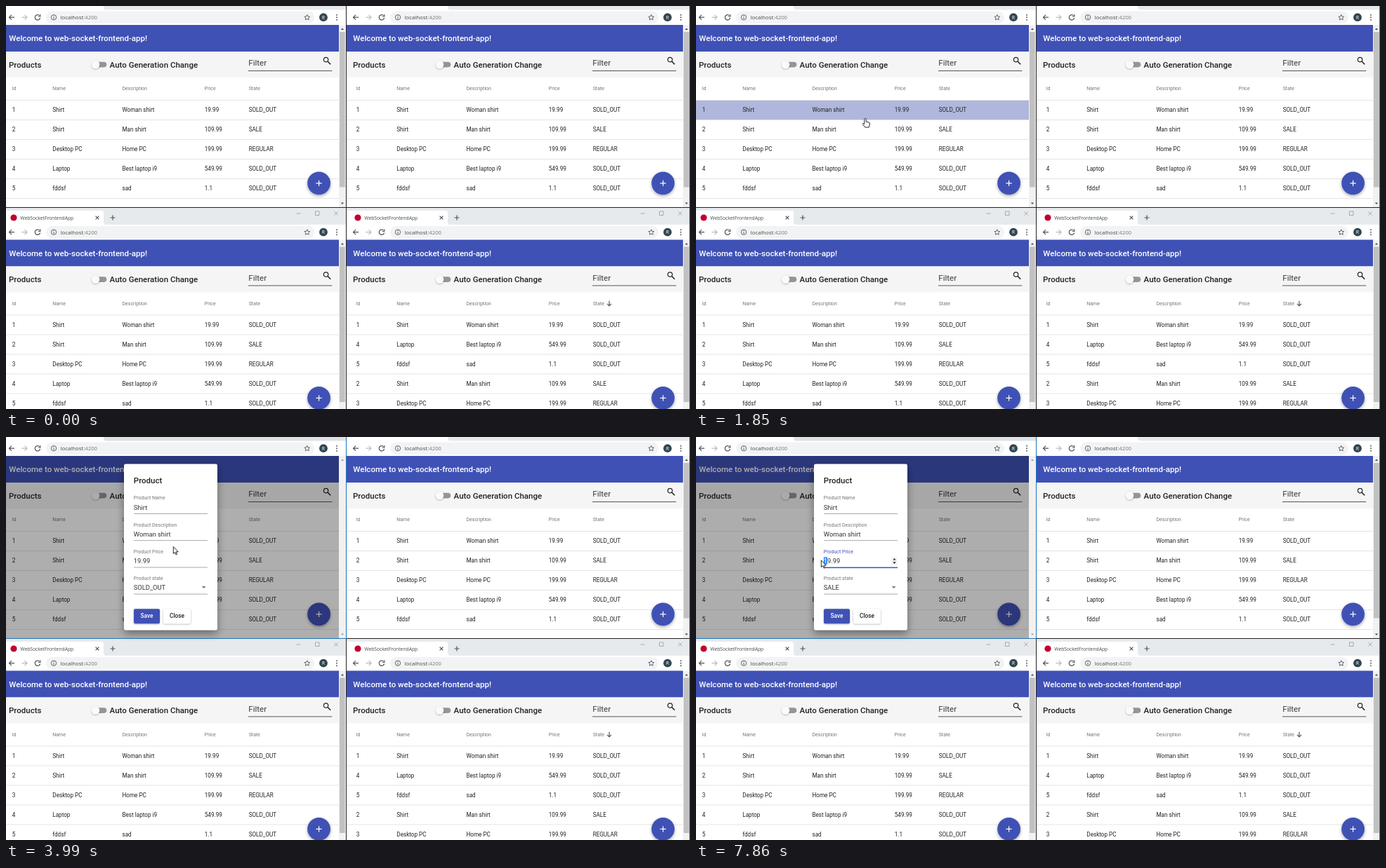
Write an HTML page that moves like this. It is 974 px wide and 575 px high and loops after 8 s.

```html
<!DOCTYPE html>
<html lang="en">
<head>
<meta charset="utf-8">
<title>Product list in four windows</title>
<style>
  html, body { margin: 0; width: 100%; height: 100%; overflow: hidden; background: #fff; }
  svg { display: block; font-family: Roboto, sans-serif; font-size: 8.15px; }
  text { white-space: pre; fill: #222; }
  .medium { font-weight: 500; font-size: 11.5px; }
  .small { font-size: 7px; fill: #757575; }
  .input { font-size: 9.33px; fill: #333; }
  .ui { font-family: "Open Sans", sans-serif; }
  .line { fill: none; stroke: #50545a; stroke-width: 1.2; }
  .field.focus .small { fill: #3f51b5; }
  .field .rule { fill: #949494; height: .8px; }
  .field.focus .rule { fill: #3f51b5; height: 1.5px; }
  .field.focus .drop { fill: #3f51b5; }
  .drop { fill: #757575; }
  .pointer { fill: #fff; stroke: #111; stroke-width: .9; stroke-linejoin: round; }
</style>
</head>
<body>
<svg id="stage" width="974" height="575" viewBox="0 0 974 575"></svg>
<script>
const LOOP = 8000;
const BLUE = '#3f51b5';
const COLUMNS = [8.7, 66.3, 165.5, 282.8, 345.7];
const HEADINGS = ['Id', 'Name', 'Description', 'Price', 'State'];
const PRODUCTS = [
  ['1', 'Shirt', 'Woman shirt', '19.99', 'SOLD_OUT'],
  ['2', 'Shirt', 'Man shirt', '109.99', 'SALE'],
  ['3', 'Desktop PC', 'Home PC', '199.99', 'REGULAR'],
  ['4', 'Laptop', 'Best laptop i9', '549.99', 'SOLD_OUT'],
  ['5', 'fddsf', 'sad', '1.1', 'SOLD_OUT'],
];
const STATES = ['SOLD_OUT', 'SALE', 'REGULAR', 'COMING_SOON'];
const ROW_TOP = 134.5, ROW_HEIGHT = 28;
const RIGHT = 490, LOWER = 306.5;

// Times of the user's actions in ms
const ACTIVATE = 3590, OPEN = 3820, AUTOFOCUS = 4070, SELECT = 4830, PICK = 6500, DRAG = 7480;

// Pointer stops: time, x, y
const PATH = [
  [0, 655, 610], [160, 640, 578], [310, 590, 515], [470, 515, 395], [620, 408, 212],
  [700, 374.8, 175.5], [930, 277, 143], [1010, 277, 143], [1300, 241, 145], [1620, 241, 145],
  [1850, 241, 160.5], [2090, 240, 167], [2480, 240, 167], [2710, 238.3, 156.5],
  [4000, 238.3, 156.5], [4600, 212, 211], [4900, 212, 211], [5200, 220, 196],
  [5520, 210.8, 204], [5670, 210.8, 204], [5850, 226, 186], [6070, 194, 168],
  [6220, 194, 168], [6450, 196, 149], [6600, 196, 149], [6990, 226, 173.5],
  [7070, 226, 173.5], [7310, 191, 174], [7480, 188, 175], [7860, 178.3, 175.8], [8000, 178.3, 175.8],
];

const rect = (x, y, w, h, fill, extra = '') =>
  `<rect x="${x}" y="${y}" width="${w}" height="${h}" fill="${fill}" ${extra}/>`;
const text = (x, y, string, extra = '') => `<text x="${x}" y="${y}" ${extra}>${string}</text>`;
const line = (d, extra = '') => `<path class="line" d="${d}" ${extra}/>`;
const shape = (d, fill, extra = '') => `<path d="${d}" fill="${fill}" ${extra}/>`;
const circle = (x, y, r, fill, extra = '') =>
  `<circle cx="${x}" cy="${y}" r="${r}" fill="${fill}" ${extra}/>`;

function browserChrome() {
  return rect(-5, -18.5, 490, 24.5, '#e7eaed', 'class="strip"') +
    shape('M-5 6V-14.5H136Q139 -14.5 139 -11.5V2Q139 5.5 143 5.5V6Z', '#fff') +
    circle(11, -4.5, 4.6, '#c3002f') +
    text(20.3, -2, 'WebSocketFrontendApp', 'class="ui" font-size="6.75" style="fill:#45494d"') +
    line('M127.6 -6.9l4.8 4.8m0 -4.8l-4.8 4.8', 'stroke-width="1"') +
    line('M148.5 -4.5h7M152 -8v7') +
    line('M413.5 -10.5h6M440.5 -13.5h5.5v5.5h-5.5zM467.3 -13.3l5.4 5.4m0 -5.4l-5.4 5.4',
      'style="stroke:#999;stroke-width:.8"') +
    rect(-5, 5.5, 490, 21.5, '#fff') +
    rect(57, 7.5, 382, 17.5, '#f1f3f4', 'rx="8.75"') +
    line('M12 16.2H4.5M8 12.7L4.5 16.2L8 19.7') +
    line('M22.5 16.2H30M26.5 12.7L30 16.2L26.5 19.7', 'style="stroke:#bbb"') +
    line('M47.6 13.6A3.7 3.7 0 1 0 48.6 17M48.8 12v3h-3') +
    `<circle class="line" cx="68" cy="16.2" r="3.7" style="stroke-width:.9"/>` +
    line('M68 15.8v2.6M68 13.8v1', 'style="stroke-width:1"') +
    text(77.5, 19, 'localhost<tspan fill="#777">:4200</tspan>', 'class="ui" font-size="7.8" style="fill:#444"') +
    line('M428.8 12.4l1.15 2.5 2.75.3-2.05 1.85.57 2.7-2.42-1.37-2.42 1.37.57-2.7-2.05-1.85 2.75-.3z',
      'style="stroke-width:.9"') +
    circle(452, 16.2, 5.9, '#2f4550') +
    text(452, 18.5, 'R', 'font-size="6.3" text-anchor="middle" style="fill:#fff"') +
    [12.7, 16.2, 19.7].map(y => circle(471, y, .95, '#50545a')).join('');
}

function tableRow(cells, index) {
  const y = ROW_TOP + index * ROW_HEIGHT;
  return rect(-5, y, 479, ROW_HEIGHT, '#fff', 'class="row"') +
    rect(-5, y - .4, 479, .8, '#dedede') +
    cells.map((cell, i) => text(COLUMNS[i], y + 16.6, cell)).join('');
}

function scrollbar() {
  return rect(474, 27, 10.5, 260, '#f1f1f1') +
    rect(475, 37, 7.8, 221.5, '#c1c1c1', 'class="thumb"') +
    shape('M476.8 34h4.4l-2.2 -2.6zM476.8 280.5h4.4l-2.2 2.6z', '#505050', 'class="arrows"');
}

function page(order, sorted) {
  return rect(-5, 27, 479, 260, '#fff') +
    rect(-5, 27, 479, 38, BLUE) +
    text(4.3, 50.1, 'Welcome to web-socket-frontend-app!', 'class="medium" style="fill:#fff"') +
    rect(-5, 65, 479, 37, '#f5f5f5') +
    text(4, 87.6, 'Products', 'class="medium"') +
    rect(123.5, 79.8, 19.8, 7.6, '#979398', 'rx="3.8"') +
    circle(127.6, 83.6, 5.7, '#fafafa', 'filter="url(#soft)"') +
    text(147.6, 87.6, 'Auto Generation Change', 'class="medium"') +
    text(345.2, 85.3, 'Filter', 'font-size="11.67" style="fill:#3c3c3c"') +
    rect(345, 92, 119.3, .9, '#444') +
    '<circle class="line" cx="455.6" cy="76.6" r="3.2" style="stroke:#222"/>' +
    line('M458 79l4.2 4.2', 'style="stroke:#222;stroke-width:1.6"') +
    HEADINGS.map((label, i) => text(COLUMNS[i], 120.1, label, 'class="small"')).join('') +
    (sorted ? line('M369 114.3v6.8M366 118.3l3 3 3 -3', 'style="stroke:#555"') : '') +
    order.map((id, i) => tableRow(PRODUCTS[id - 1], i)).join('') +
    rect(-5, 274.1, 479, .8, '#dedede') +
    circle(445.6, 252.8, 16.4, BLUE, 'filter="url(#lift)"') +
    line('M441.5 252.8h8.2M445.6 248.7v8.2', 'style="stroke:#fff;stroke-width:1.2"') +
    scrollbar();
}

function browser(dx, dy, clip, order, sorted = false) {
  return `<g clip-path="url(#${clip})"><g class="window" transform="translate(${dx} ${dy})">` +
    browserChrome() + page(order, sorted) + '</g></g>';
}

function field(name, label, value, y, extra = '') {
  return `<g class="field" id="${name}">` + text(181.8, y, label, 'class="small"') +
    text(181.8, y + 14.1, value, 'class="input value"') +
    rect(182, y + 19.7, 105, .8, '', 'class="rule"') + extra + '</g>';
}

function dialog() {
  const spinner = '<g id="spinner">' + rect(278.5, 171.5, 8, 10.5, '#f0f0f0') +
    shape('M280.3 175.6h4.4l-2.2 -2.7zM280.3 178.2h4.4l-2.2 2.7z', '#333') + '</g>';
  const selection = '<g id="selection">' + rect(181.8, 171.3, 5.2, 10.4, '#3390ff') +
    text(181.8, 180, '1', 'class="input" style="fill:#fff"') + '</g>';
  return '<g id="dialog">' +
    rect(168, 38.5, 133, 237, '#fff', 'rx="2.3" filter="url(#deep)"') +
    text(181.8, 66.2, 'Product', 'class="medium"') +
    field('name', 'Product Name', 'Shirt', 89.4) +
    field('description', 'Product Description', 'Woman shirt', 127.6) +
    field('price', 'Product Price', '19.99', 165.9, spinner + selection) +
    field('state', 'Product state', 'SOLD_OUT', 204, '<path class="drop" d="M278.8 213h5.8l-2.9 2.9z"/>') +
    rect(182, 245.3, 37, 21, BLUE, 'rx="2" filter="url(#soft)"') +
    rect(224, 245.3, 39, 21, '#fff', 'rx="2" filter="url(#soft)"') +
    text(200.5, 258.2, 'Save', 'font-size="8.3" font-weight="500" text-anchor="middle" style="fill:#fff"') +
    text(243.5, 258.2, 'Close', 'font-size="8.3" font-weight="500" text-anchor="middle"') + '</g>';
}

function menu() {
  return '<g id="menu">' + rect(172.5, 108, 124.3, 112.5, '#fff', 'rx="2" filter="url(#lift)"') +
    STATES.map((state, i) => rect(172.5, 108 + i * 28, 124.3, 28, '#fff', 'class="option"') +
      text(181.8, 125.2 + i * 28, state, `class="input" ${i ? '' : `style="fill:${BLUE}"`}`)).join('') + '</g>';
}

const shadow = (id, dy, blur, alpha) =>
  `<filter id="${id}" x="-30%" y="-30%" width="160%" height="170%">
    <feDropShadow dx="0" dy="${dy}" stdDeviation="${blur}" flood-opacity="${alpha}"/></filter>`;
const clip = (id, x, y, w, h) => `<clipPath id="${id}">${rect(x, y, w, h, '#000')}</clipPath>`;

const stage = document.getElementById('stage');
stage.innerHTML = '<defs>' +
  shadow('soft', .8, .8, .35) + shadow('lift', 1.8, 2, .35) + shadow('deep', 5, 6, .4) +
  clip('a', 0, 0, 484, 287) + clip('b', 485, 0, 489, 287) +
  clip('c', 0, 288, 484, 287) + clip('d', 485, 288, 489, 287) + '</defs>' +
  browser(0, 0, 'a', [1, 2, 3, 4, 5]) + browser(RIGHT, 0, 'b', [1, 2, 3, 4, 5]) +
  browser(0, LOWER, 'c', [1, 2, 3, 4, 5]) + browser(RIGHT, LOWER, 'd', [1, 4, 5, 2, 3], true) +
  rect(484, 0, 1, 575, '#222') + rect(0, 287, 974, 1, '#222') + rect(973.2, 0, .8, 575, '#444') +
  '<g id="active">' + rect(484, 0, 1, 288, '#1c74bb') + rect(0, 287, 485, 1, '#1c74bb') + '</g>' +
  rect(0, 27, 474, 260, '#000', 'id="backdrop"') + dialog() + menu() +
  '<g id="pointer">' +
  '<path class="pointer" data-kind="arrow" d="M0 0V10L2.3 7.9 3.8 11.4 5.3 10.8 3.8 7.3H7Z"/>' +
  '<path class="pointer" data-kind="hand" d="M-1.2 1C-1.2 -.4 1.2 -.4 1.2 1V4.6L5 5.4Q6.6 5.8 6.4 7.5L5.8 10.6 5.2 12.6H-.2L-3.6 8.2Q-4 6.6 -2.4 7L-1.2 8Z"/>' +
  '<path class="line" data-kind="beam" d="M-2 -5.5H2M0 -5.5V5.5M-2 5.5H2" style="stroke:#111;stroke-width:.8"/></g>';

const $ = id => document.getElementById(id);
const windows = [...stage.querySelectorAll('.window')].map(w => [...w.querySelectorAll('.row')]);
const options = [...stage.querySelectorAll('.option')];
const fields = [...stage.querySelectorAll('.field')];
const cursors = [...$('pointer').children];
const firstWindow = stage.querySelector('.window');
const stateValue = $('state').querySelector('.value');

const clamp = v => Math.min(1, Math.max(0, v));
const easeOut = v => 1 - (1 - clamp(v)) ** 3;
const show = (element, visible) => { element.style.display = visible ? '' : 'none'; };

function pointerAt(t) {
  const i = PATH.findIndex(stop => stop[0] > t);
  const [t0, x0, y0] = PATH[i - 1], [t1, x1, y1] = PATH[i];
  const p = (t - t0) / (t1 - t0);
  return [x0 + (x1 - x0) * p, y0 + (y1 - y0) * p];
}

function hoverRows(x, y, enabled) {
  const right = x > 484 ? 1 : 0, lower = y > 287 ? 1 : 0;
  const inside = enabled && x - right * RIGHT < 474;
  const row = Math.floor((y - lower * LOWER - ROW_TOP) / ROW_HEIGHT);
  windows.forEach((rows, w) => rows.forEach((element, i) => {
    const on = inside && w === lower * 2 + right && i === row;
    element.setAttribute('fill', on ? '#b0b7dc' : '#fff');
  }));
  return inside && row >= 0 && row < 5;
}

function zoom(element, cx, cy, sx, sy, opacity) {
  element.setAttribute('transform', `translate(${cx} ${cy}) scale(${sx} ${sy}) translate(${-cx} ${-cy})`);
  element.style.opacity = opacity;
}

function render(t) {
  const [x, y] = pointerAt(t);
  const opened = t >= OPEN;
  const menuOpen = t >= SELECT && t < PICK;
  const overRow = hoverRows(x, y, !opened);

  show($('active'), t >= ACTIVATE);
  firstWindow.querySelector('.strip').setAttribute('fill', t >= ACTIVATE ? '#dee1e6' : '#e7eaed');
  show(firstWindow.querySelector('.thumb'), !opened);
  firstWindow.querySelector('.arrows').setAttribute('fill', opened ? '#a3a3a3' : '#505050');

  $('backdrop').style.opacity = opened ? .32 * easeOut((t - OPEN + 40) / 250) : 0;
  show($('dialog'), opened);
  const grow = easeOut((t - OPEN + 30) / 150);
  zoom($('dialog'), 234.5, 157, .7 + .3 * grow, .7 + .3 * grow, grow);

  const focus = t < AUTOFOCUS ? '' : t < SELECT ? 'name' : t < DRAG ? 'state' : 'price';
  fields.forEach(f => f.classList.toggle('focus', f.id === focus));
  stateValue.textContent = t < PICK ? 'SOLD_OUT' : 'SALE';

  const unfold = easeOut((t - SELECT + 30) / 120);
  const fade = 1 - clamp((t - PICK) / 100);
  show($('menu'), t >= SELECT && fade > 0);
  zoom($('menu'), 234.5, 122, 1, .8 + .2 * unfold, unfold * fade);
  const hovered = Math.floor((y - 108) / 28);
  options.forEach((option, i) =>
    option.setAttribute('fill', i === 0 ? '#e0e0e0' : i === hovered ? '#f5f5f5' : '#fff'));

  const inField = opened && !menuOpen && x >= 182 && x <= 287;
  const overInput = inField && [95, 133, 171].some(top => y >= top && y <= top + 14);
  const overSelect = inField && y > 196 && y < 225;
  show($('spinner'), focus === 'price' || overInput && y > 170);
  show($('selection'), t > DRAG + 200);

  const kind = overRow || menuOpen || overSelect ? 'hand' : overInput ? 'beam' : 'arrow';
  cursors.forEach(c => show(c, c.dataset.kind === kind));
  show($('pointer'), t >= 160);
  $('pointer').setAttribute('transform', `translate(${x} ${y})`);
}

const start = performance.now();
function tick() {
  render((performance.now() - start) % LOOP);
  requestAnimationFrame(tick);
}
tick();
</script>
</body>
</html>
```
